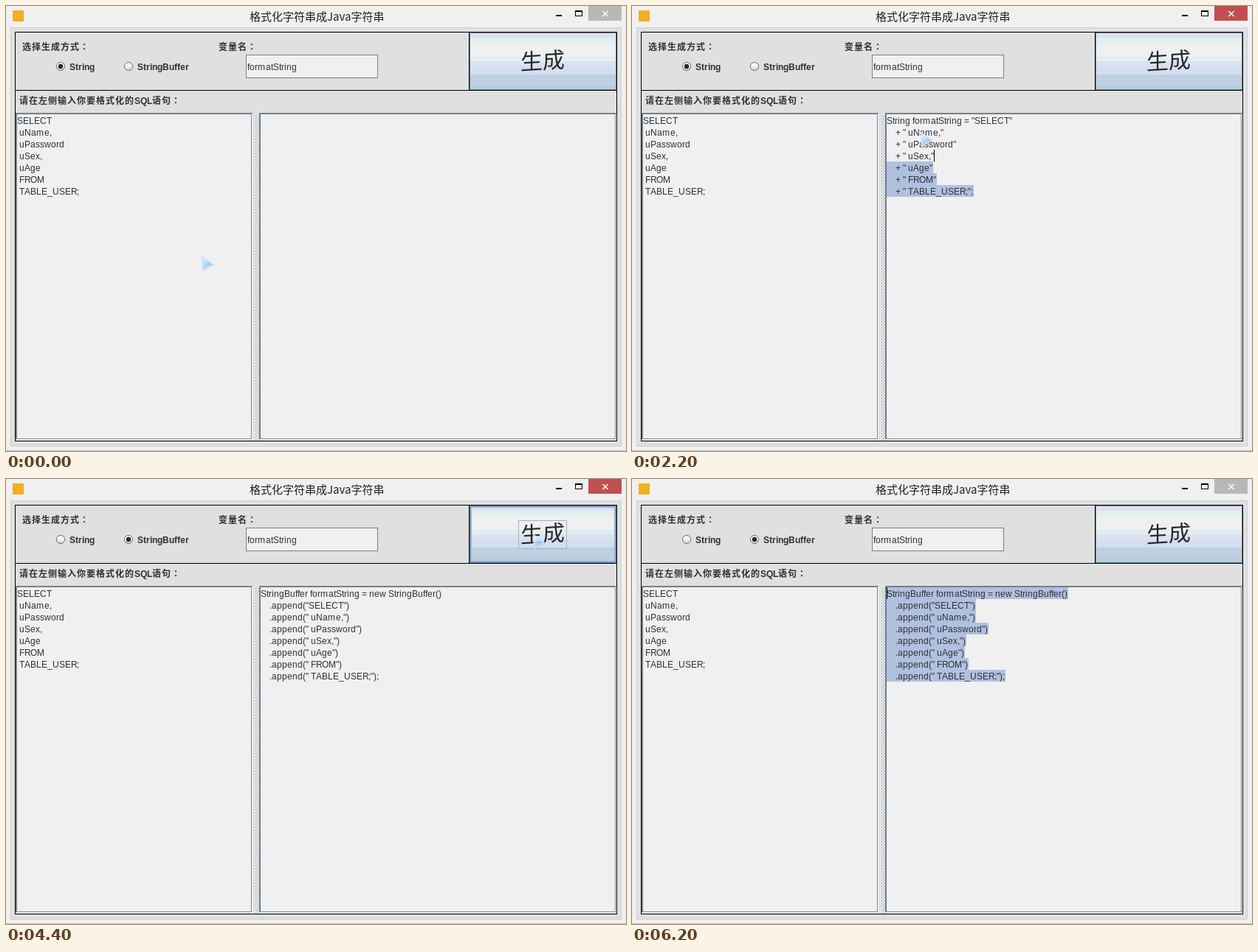
An HTML page with a canvas that plays this animation: 840x604 px, repeating every 6400 ms.

```html
<!DOCTYPE html>
<html lang="zh-CN">
<head>
<meta charset="utf-8">
<title>格式化字符串</title>
<style>
html, body { margin: 0; width: 100%; height: 100%; overflow: hidden; background: #f0f0f0; }
canvas { display: block; }
</style>
</head>
<body>
<canvas id="stage" width="840" height="604"></canvas>
<script>
const ctx = document.getElementById('stage').getContext('2d');
const STEP = 200, COUNT = 32, ROW = 16, TOP = 147;
const LATIN = '"Liberation Sans", Arial, sans-serif';
const CJK = '"Noto Sans CJK SC", "Noto Sans CJK", "Noto Sans CJK JP", sans-serif';
const CJK_WIDE = '"Noto Sans CJK JP", "Noto Sans CJK", sans-serif';
const EDGE = '#708090', INK = '#303030', PAPER = '#f0f0f0', PANEL = '#e0e0e0', MARK = '#b0c0e0';

const sql = ['SELECT', ' uName,', ' uPassword', ' uSex,', ' uAge', ' FROM', ' TABLE_USER;'];
const last = sql.length - 1;
const joined = sql.map((s, i) =>
  (i ? '    + ' : 'String formatString = ') + `"${s}"` + (i === last ? ';' : ''));
const appended = ['StringBuffer formatString = new StringBuffer()',
  ...sql.map((s, i) => `    .append("${s}")` + (i === last ? ';' : ''))];

// Pointer position at each step; it is hidden after the last one.
const pointer = [
  [265, 339], [220, 320], [103, 250], [60, 210], [18, 150], [614, 128], [712, 78],
  [714, 75], [600, 150], [470, 250], [430, 215], [391, 171], [350, 150],
  [346, 152], [325, 150], [290, 135], [245, 110], [205, 87], [165, 77],
  [240, 76], [480, 70], [690, 72], [714, 75], [640, 120], [640, 120],
  [520, 281], [346, 150], [198, 128], [230, 180]
];

function fill(color, x, y, w, h) {
  ctx.fillStyle = color;
  ctx.fillRect(x, y, w, h);
}

function frame(color, x, y, w, h) {
  ctx.strokeStyle = color;
  ctx.lineWidth = 1;
  ctx.strokeRect(x + 0.5, y + 0.5, w - 1, h - 1);
}

// Whole-pixel glyph advances, as in desktop toolkits.
function advance(ch) {
  if (ch === 'm') return 11;
  if (ch === 'R') return 8;
  return Math.round(ctx.measureText(ch).width);
}

function width(str) {
  ctx.font = '12px ' + LATIN;
  return [...str].reduce((sum, ch) => sum + advance(ch), 0);
}

function text(str, x, y, bold) {
  const weight = bold ? 'bold ' : '';
  ctx.fillStyle = INK;
  for (const ch of str) {
    const wide = ch > '\u2fff';
    const face = ch === '：' ? CJK_WIDE : wide ? CJK : LATIN;
    ctx.font = weight + '12px ' + face;
    ctx.fillText(ch, x, y);
    x += wide ? 13 : bold ? Math.round(ctx.measureText(ch).width) : advance(ch);
  }
}

function lines(list, x, sel) {
  list.forEach((str, i) => {
    const y = TOP + i * ROW;
    if (sel && i >= sel.row) {
      const from = i === sel.row ? width(str.slice(0, sel.col)) : 0;
      const to = width(str);
      if (to > from) fill(MARK, x + from, y, to - from + 1, ROW);
      if (i === sel.row) fill('#000', x + from, y, 1, ROW);
    }
    text(str, x, y + 13);
  });
}

function pane(x, w) {
  const y = 145, h = 443;
  fill(EDGE, x, y, w, 1);
  fill(EDGE, x, y, 1, h);
  fill(PAPER, x + 1, y + 1, w - 2, h - 1);
  frame(EDGE, x + 1, y + 1, w - 2, h - 1);
  fill('#fff', x + w - 1, y + 1, 1, h);
  fill('#fff', x, y + h, w, 1);
}

function radio(x, y, on) {
  const g = ctx.createLinearGradient(0, y - 6, 0, y + 6);
  g.addColorStop(0, '#e0e8f0');
  g.addColorStop(0.35, '#fafafa');
  g.addColorStop(1, '#c0d0e0');
  ctx.beginPath();
  ctx.arc(x, y, 5.6, 0, 7);
  ctx.fillStyle = g;
  ctx.fill();
  ctx.strokeStyle = '#607888';
  ctx.lineWidth = 1;
  ctx.stroke();
  if (!on) return;
  ctx.beginPath();
  ctx.arc(x, y, 3.2, 0, 7);
  ctx.fillStyle = '#282828';
  ctx.fill();
}

function titleBar(active) {
  fill('#f0b020', 9, 6, 15, 15);
  ctx.font = '15px ' + CJK;
  ctx.fillStyle = '#202020';
  ctx.fillText('格式化字符串成Java字符串', 330, 20);
  fill('#000', 745, 12, 8, 2);
  frame('#000', 771, 6, 10, 8);
  fill('#000', 771, 6, 10, 2);
  fill(active ? '#c05050' : '#b8b8b8', 789, 0, 45, 20);
  ctx.strokeStyle = '#fff';
  ctx.lineWidth = 1.5;
  ctx.beginPath();
  ctx.moveTo(808.5, 7); ctx.lineTo(815.5, 14);
  ctx.moveTo(815.5, 7); ctx.lineTo(808.5, 14);
  ctx.stroke();
}

function button(hover, focus) {
  const bands = [[37, '#e0e0f0'], [43, '#e0f0f0'], [51, '#f0f0f0'], [69, '#e0f0f0'],
    [75, '#e0e0f0'], [82, '#d0e0f0'], [93, '#c0d0e0'], [108, '#b0d0e0']];
  for (const [y, color] of bands) fill(color, 628, y, 199, 114 - y);
  frame(EDGE, 628, 36, 199, 78);
  if (hover) {
    frame('#80a0d0', 629, 37, 197, 76);
    frame('#a0b8e0', 630, 38, 195, 74);
  }
  if (focus) frame('#a0b0d0', 694, 56, 66, 39);
  // A slight upward slant follows the brush-style lettering.
  ctx.save();
  ctx.translate(697, 87);
  ctx.transform(1, -0.06, 0, 1, 0, 0);
  ctx.font = '300 30px KaiTi, ' + CJK;
  ctx.fillStyle = '#282828';
  ctx.fillText('生成', 0, 0);
  ctx.restore();
}

function bumps() {
  for (let y = 147; y < 588; y += 2) {
    for (let x = 337 + (y & 2 ? 0 : 2); x < 342; x += 4) {
      fill('#fff', x, y, 1, 1);
      fill('#8090a0', x + 1, y + 1, 1, 1);
    }
  }
}

function arrow(x, y) {
  ctx.save();
  ctx.translate(x, y);
  const g = ctx.createLinearGradient(2, 4, 13, 16);
  g.addColorStop(0, '#e8f4fc');
  g.addColorStop(0.6, '#a0d0f0');
  g.addColorStop(1, '#78b8e8');
  ctx.beginPath();
  ctx.moveTo(1, 1);
  ctx.lineTo(16, 12);
  ctx.quadraticCurveTo(8, 13, 2, 20);
  ctx.closePath();
  ctx.globalAlpha = 0.92;
  ctx.fillStyle = g;
  ctx.fill();
  ctx.lineJoin = 'round';
  ctx.lineWidth = 2;
  ctx.strokeStyle = '#d0e4f4';
  ctx.stroke();
  ctx.lineWidth = 0.8;
  ctx.strokeStyle = '#80b8e0';
  ctx.beginPath();
  ctx.moveTo(16, 12.5);
  ctx.quadraticCurveTo(8, 14, 2.5, 20);
  ctx.stroke();
  ctx.restore();
}

const at = (row, col = 0) => ({ row, col });

function leftSelection(n) {
  if (n < 3 || n > 6) return null;
  return n === 3 ? at(4) : at(0);
}

function rightSelection(n) {
  if (n === 10) return at(5);
  if (n === 11) return at(3, joined[3].length);
  if (n === 12) return at(0, 3);
  return (n > 12 && n < 18) || n > 25 ? at(0) : null;
}

function draw(n) {
  const buffer = n >= 18;
  const hover = n === 6 || n === 7 || n === 21 || n === 22;
  const focus = n === 7 || n === 8 || (n >= 22 && n <= 24);

  fill(PAPER, 0, 0, 840, 604);
  fill('#c0c0c0', 0, 603, 840, 1);
  fill(PANEL, 6, 29, 828, 569);
  frame('#d0d0d0', 6, 29, 828, 569);
  titleBar(n > 1 && n < 31);

  frame('#000', 12, 35, 816, 556);
  fill('#000', 12, 114, 816, 1);
  fill('#000', 627, 35, 1, 80);

  text('选择生成方式：', 22, 60, true);
  text('变量名：', 288, 60, true);
  text('请在左侧输入你要格式化的SQL语句：', 18, 133, true);
  radio(74, 82, !buffer);
  radio(166, 82, buffer);
  text('String', 86, 87, true);
  text('StringBuffer', 178, 87, true);
  if (n >= 18 && n <= 20) frame('#a0b0d0', 176, 75, 73, 15);

  fill(PAPER, 325, 66, 179, 32);
  frame(EDGE, 325, 66, 179, 32);
  text('formatString', 327, 87);
  button(hover, focus);

  pane(13, 321);
  pane(343, 484);
  bumps();
  lines(sql, 15, leftSelection(n));
  if (n >= 7) lines(n < 22 ? joined : appended, 345, rightSelection(n));
  if (pointer[n]) arrow(...pointer[n]);
}

const start = performance.now();
let shown = -1;
function tick() {
  const n = Math.floor((performance.now() - start) / STEP) % COUNT;
  if (n !== shown) draw(shown = n);
  requestAnimationFrame(tick);
}
tick();
</script>
</body>
</html>
```
